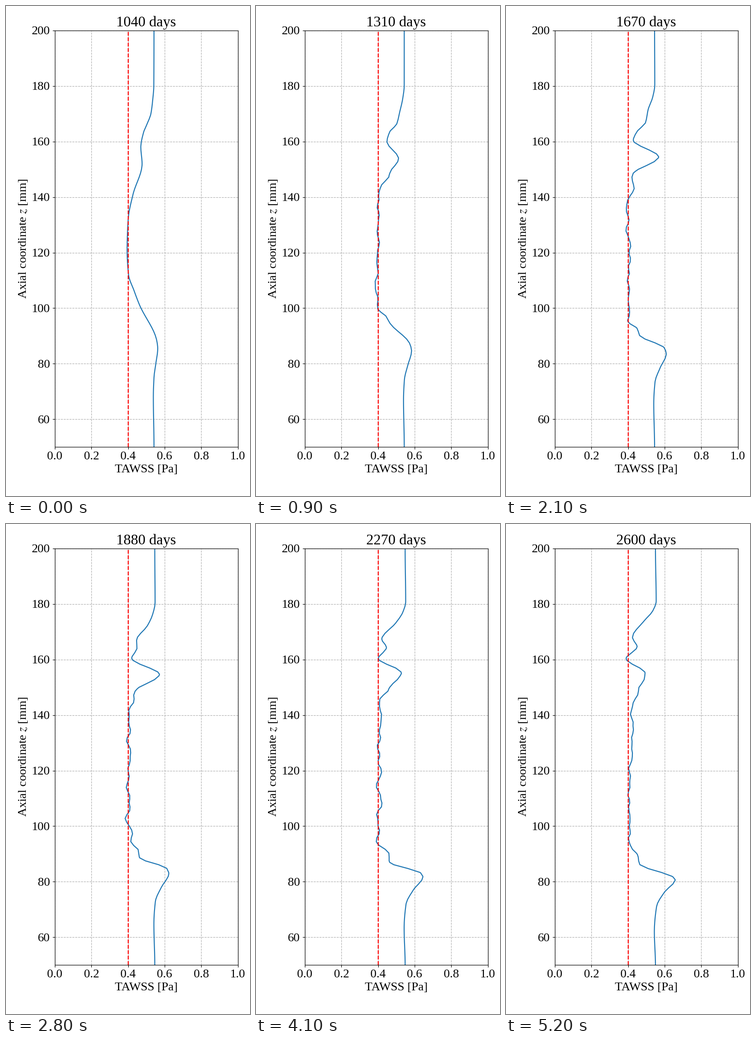
Write a matplotlib script that moves like this. It is 529x1058 px and loops after 5.3 s.

```python
import numpy as np
import matplotlib.pyplot as plt
from matplotlib.animation import FuncAnimation

FRAMES, INTERVAL = 53, 100
FIRST_DAY, DAY_STEP = 1040, 30

plt.rcParams.update({
    "font.family": "Liberation Serif",
    "font.size": 18,
    "mathtext.fontset": "stix",
})

MESH = np.linspace(50, 200, 109)
KERNEL = [0.25, 0.5, 0.25]
rng = np.random.default_rng(7)
JITTER = [np.convolve(rng.normal(0, 0.012, MESH.size), KERNEL, "same")
          for _ in range(FRAMES)]


def smoothstep(x):
    x = np.clip(x, 0, 1)
    return x * x * (3 - 2 * x)


def monotone_cubic(x, xp, yp):
    """Shape-preserving cubic interpolation."""
    h = np.diff(xp)
    d = np.diff(yp) / h
    slope = np.zeros_like(yp)
    same = d[:-1] * d[1:] > 0
    slope[1:-1][same] = 2 * d[:-1][same] * d[1:][same] / (d[:-1] + d[1:])[same]
    k = np.clip(np.searchsorted(xp, x) - 1, 0, len(h) - 1)
    t = (x - xp[k]) / h[k]
    return (yp[k] * (1 + 2 * t) * (1 - t) ** 2
            + yp[k + 1] * t ** 2 * (3 - 2 * t)
            + h[k] * t * (1 - t) * (slope[k] * (1 - t) - slope[k + 1] * t))


def profile(frame):
    t = frame / (FRAMES - 1)
    grow = 1 - (1 - t) ** 1.3        # lower peak rising
    settle = 1 - np.exp(-9 * t)      # plateau spreading out
    end = 0.542 + 0.008 * t

    peak_z, peak = 85.5 - 4.8 * t, 0.5625 + 0.0955 * grow
    foot_z = 85.5 + 15.5 * np.exp(-3 * t)
    low_z = 93 + 7 * np.exp(-3 * t) + 12 * (1 - settle)
    ramp_z = 141 + 8.5 * settle
    crest = 0.477 + 0.02 * t + 0.085 * abs(np.sin(np.pi * t)) ** 1.5

    zp, vp = np.array([
        # lower tail and peak
        (50, end),
        (68 - 6 * t, 0.5385 + 0.0055 * t),
        (75 - 4 * t, 0.542 + 0.014 * t),
        (80 - 3.7 * t, 0.552 + 0.048 * grow),
        (peak_z, peak),
        (peak_z + 3 - 2 * t, peak - 0.006 - 0.006 * settle),
        # step down to the plateau
        (foot_z, 0.464),
        ((foot_z + low_z) / 2, 0.432 + 0.02 * settle),
        (low_z, 0.403),
        (121, 0.395 + 0.015 * t),
        (132 + 9 * settle, 0.401 + 0.012 * t),
        # upper crest, notch, bump and dip
        (ramp_z, 0.4275 + 0.03 * settle),
        (152 + 2.2 * settle + t, crest),
        (158 + 2.5 * settle, 0.47 - 0.085 * t ** 0.8),
        (163.3 + 1.4 * t, 0.444 + 0.041 * np.exp(-4 * t)),
        (166 + 1.8 * t, 0.502 - 0.08 * smoothstep((t - 0.35) / 0.3)),
        # upper tail
        (170 + 4 * t, 0.525 - 0.036 * t),
        (175 + 2.5 * t, 0.535),
        (180 + t, 0.541 + 0.013 * t),
        (200, end),
    ]).T

    z = np.union1d(MESH, zp)
    # The ragged zone spreads upwards from the plateau.
    rough = settle * np.interp(
        z, [foot_z, low_z, ramp_z - 2, ramp_z + 1 + 24 * t], [0, 1, 1, 0])
    return monotone_cubic(z, zp, vp) + rough * np.interp(z, MESH, JITTER[frame]), z


fig, ax = plt.subplots(figsize=(5, 10), dpi=105.8, facecolor="white")
fig.subplots_adjust(left=0.2, right=0.95, bottom=0.1, top=0.95)
ax.set(xlim=(0, 1), ylim=(50, 200),
       xticks=np.arange(0, 1.1, 0.2), yticks=np.arange(60, 201, 20),
       xlabel="TAWSS [Pa]", ylabel="Axial coordinate $z$ [mm]")
ax.grid(linestyle="--")
curve, = ax.plot([], [], color="tab:blue")
ax.axvline(0.4, color="red", linestyle="--")
title = ax.set_title("")


def update(frame):
    curve.set_data(*profile(frame))
    title.set_text(f"{FIRST_DAY + DAY_STEP * frame} days")
    return curve, title


anim = FuncAnimation(fig, update, frames=FRAMES, interval=INTERVAL,
                     repeat=True, repeat_delay=0)
plt.show()
```
